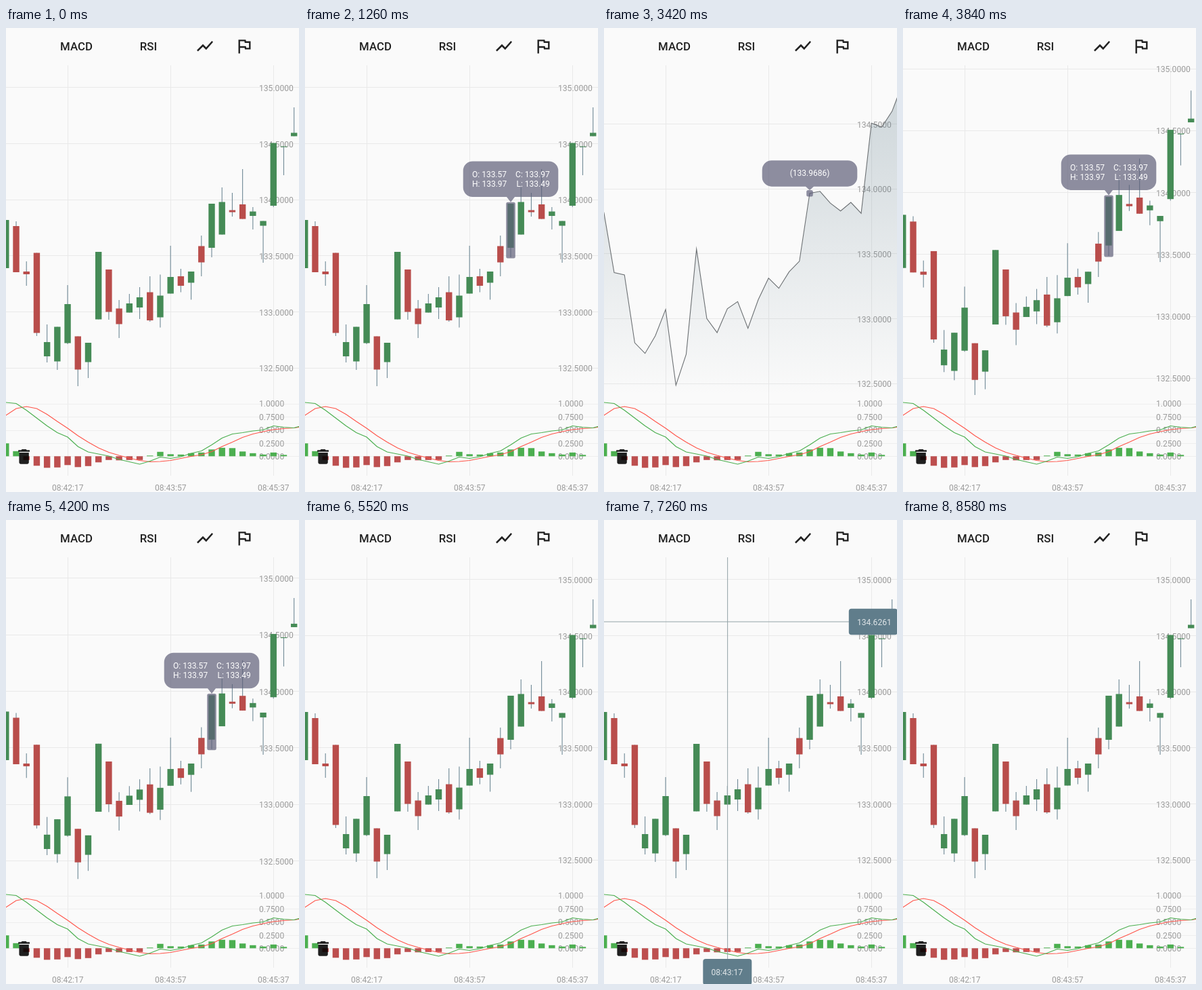
An HTML page with a canvas for the animation above (9360 ms loop, 433x684 px).

```html
<!DOCTYPE html>
<html lang="en">
<head>
<meta charset="utf-8">
<title>Candle chart</title>
<style>
html, body { margin: 0; width: 100%; height: 100%; overflow: hidden; background: #fafafa; }
canvas { display: block; }
</style>
</head>
<body>
<canvas id="stage" width="433" height="684"></canvas>
<script>
const ctx = document.getElementById('stage').getContext('2d');
const LOOP = 9360, STEP = 60;
const W = 433, TOP = 55, BOTTOM = 541, ZERO = 631.3;
const GREEN = '#458b56', RED = '#b94d4b', LABEL = '#9c9c9c', SLATE = '#607d8b';
const TIP = 'rgba(96,96,122,.7)';
const PICKED = 20;

// open, close, high, low as heights on the candle scale
const candles = [
  [354, 283, 283, 354], [292, 360, 285, 360], [359, 363, 344, 380], [331.5, 449.5, 331.5, 454],
  [484, 463, 437, 493], [491.5, 440.5, 440.5, 504], [464.5, 407, 379, 466], [454.5, 503.5, 454.5, 528],
  [492.5, 464, 464, 516], [429.5, 330, 330, 429.5], [356, 418.5, 356, 430], [413.5, 436.5, 401, 457],
  [419.5, 406, 392, 419.5], [412, 397, 382, 429], [389.5, 431, 366, 433], [426.5, 394.5, 363.5, 441.5],
  [391.5, 367, 321, 391.5], [366, 380, 355, 389.5], [375.5, 359, 359, 400.5], [321.5, 345.5, 306, 366],
  [324, 259, 259, 338], [304.5, 256.5, 235, 304.5], [268.5, 271.5, 243, 278], [260, 281.5, 208, 281.5],
  [277, 270.5, 264, 297], [291.5, 284.5, 284.5, 346], [262, 169.5, 169.5, 264], [175.5, 174.5, 174.5, 217],
  [159.5, 154.5, 117, 159.5], [154, 120, 120, 154]
];
const macd = [552, 553.5, 563.5, 575, 586.5, 596.5, 603, 617, 625, 628, 631, 636, 639.5, 643, 638.5,
  632.5, 634.5, 632, 627, 623.5, 614.5, 604.5, 598.5, 596.5, 594, 592.5, 586.5, 588.5, 589.5, 585];
const signal = [571, 561, 558, 561, 569.5, 580, 590, 601, 610.5, 619, 625.5, 630, 634, 637.5, 639.5,
  639, 637.5, 634.5, 631.5, 629, 624.5, 617, 610.5, 603.5, 598.5, 595, 592, 590.5, 589.5, 587.5];

// Material-style 24-unit outlines
const trendIcon = new Path2D('M3.5 18.49l6-6.01 4 4L22 6.92l-1.41-1.41-7.09 7.97-4-4L2 16.99z');
const flagIcon = new Path2D('M12.36 6l.4 2H18v6h-3.36l-.4-2H7V6h5.36M14 4H5v17h2v-7h5.6l.4 2h7V6h-5.6L14 4z');
const binIcon = new Path2D('M6 19c0 1.1.9 2 2 2h8c1.1 0 2-.9 2-2V7H6zM19 4h-3.5l-1-1h-5l-1 1H5v2h14z');

const clamp = v => Math.max(0, Math.min(1, v));
const colX = i => i * 15.21 - 0.2;
const priceY = p => 171.1 + (134.5 - p) * 165.35;

let zoom = 1;
const zoomY = y => 356.5 + (y - 356.5) * zoom;

function text(str, x, y, color, align = 'left', font = '12.1px Roboto, sans-serif') {
  ctx.font = font;
  ctx.fillStyle = color;
  ctx.textAlign = align;
  ctx.fillText(str, x, y);
}

function segment(x1, y1, x2, y2, color, width = 1) {
  ctx.strokeStyle = color;
  ctx.lineWidth = width;
  ctx.beginPath();
  ctx.moveTo(x1, y1);
  ctx.lineTo(x2, y2);
  ctx.stroke();
}

function box(x, y, w, h, r, color) {
  ctx.fillStyle = color;
  ctx.beginPath();
  ctx.roundRect(x, y, w, h, r);
  ctx.fill();
}

function polyline(ys, color, width) {
  ctx.strokeStyle = color;
  ctx.lineWidth = width;
  ctx.beginPath();
  ys.forEach((y, i) => ctx.lineTo(colX(i), y));
  ctx.stroke();
}

function icon(path, x, y, color) {
  ctx.save();
  ctx.translate(x, y);
  ctx.scale(1.2, 1.2);
  ctx.fillStyle = color;
  ctx.fill(path, 'evenodd');
  ctx.restore();
}

function drawToolbar() {
  const font = '500 16.8px Roboto, sans-serif';
  text('MACD', 104, 32.5, '#212121', 'center', font);
  text('RSI', 210.5, 32.5, '#212121', 'center', font);
  icon(trendIcon, 279.6, 12.4, '#212121');
  icon(flagIcon, 337.5, 12.4, '#212121');
}

function drawGrid() {
  const line = '#e9e9e9';
  ['08:42:17', '08:43:57', '08:45:37'].forEach((time, i) => {
    const x = 91.5 + i * 152;
    segment(x, TOP, x, 660, line);
    text(time, x - .3, 682, LABEL, 'center');
  });
  for (let p = 135; p >= 132.5; p -= .5) {
    const y = zoomY(priceY(p));
    if (y < TOP) continue;
    segment(0, Math.round(y) - .5, W, Math.round(y) - .5, line);
    text(p.toFixed(4), 374, y + 4.6, LABEL);
  }
  for (let v = 0; v <= 1; v += .25) {
    const y = ZERO - v * 77.6;
    segment(0, Math.round(y) + .5, W, Math.round(y) + .5, '#eeeeee');
    text(v.toFixed(4), 374, y + 4.6, LABEL);
  }
}

function drawCandles() {
  candles.forEach(([open, close, high, low], i) => {
    const x = colX(i), a = zoomY(Math.min(open, close)), b = zoomY(Math.max(open, close));
    segment(x, zoomY(high), x, zoomY(low), '#6f8996', 1.1);
    ctx.fillStyle = close < open ? GREEN : RED;
    ctx.fillRect(x - 4.7, a, 9.4, b - a);
  });
}

function drawArea() {
  const ys = candles.map(c => zoomY(c[1]));
  const fill = ctx.createLinearGradient(0, 90, 0, BOTTOM);
  fill.addColorStop(0, 'rgba(96,125,139,.29)');
  fill.addColorStop(1, 'rgba(96,125,139,0)');
  ctx.fillStyle = fill;
  ctx.beginPath();
  ctx.moveTo(colX(0), BOTTOM);
  ys.forEach((y, i) => ctx.lineTo(colX(i), y));
  ctx.lineTo(colX(ys.length - 1), BOTTOM);
  ctx.fill();
  polyline(ys, '#6c7073', 1.1);
}

function drawMacd() {
  macd.forEach((m, i) => {
    const h = m - signal[i];
    ctx.fillStyle = h < 0 ? '#4caf50' : '#bd4f4f';
    ctx.fillRect(colX(i) - 4.7, ZERO, 9.4, h);
  });
  polyline(signal, '#ff5449', 1.1);
  polyline(macd, '#4caf50', 1.2);
  icon(binIcon, 12.2, 617.5, 'rgba(0,0,0,.88)');
}

function drawTooltip(alpha, isLine) {
  if (!alpha) return;
  const [, close, , low] = candles[PICKED];
  const x = colX(PICKED), y = zoomY(close);
  const height = isLine ? 38.5 : 52.5, base = y - 10;
  const markTop = isLine ? y - 4.7 : y - 2.3;
  const markEnd = isLine ? y + 4.7 : zoomY(low) + 1.5;
  const half = isLine ? 4.8 : 6.8;
  ctx.globalAlpha = alpha;
  box(x - half, markTop, half * 2, markEnd - markTop, 2.5, TIP);
  ctx.beginPath();
  ctx.roundRect(x - 70.3, base - height, 140.6, height, 14);
  ctx.moveTo(x - 6, base);
  ctx.lineTo(x + 6, base);
  ctx.lineTo(x, markTop);
  ctx.fill();
  const font = '12px Roboto, sans-serif', white = '#fff';
  if (isLine) {
    text('(133.9686)', x, base - 15.3, white, 'center', font);
  } else {
    text('O: 133.57', 247, base - 29.3, white, 'left', font);
    text('C: 133.97', 361.7, base - 29.3, white, 'right', font);
    text('H: 133.97', 247, base - 14.8, white, 'left', font);
    text('L: 133.49', 361.7, base - 14.8, white, 'right', font);
  }
  ctx.globalAlpha = 1;
}

function crosshairAt(t) {
  if (t < 6540) return [9, 166];
  if (t < 6600) return [9, 162];
  if (t < 6900) return [10, 160];
  const k = clamp((t - 6900) / 360);
  return [Math.round(10 + 2 * k), 158 - 8 * k];
}

function drawCrosshair(t) {
  if (t < 6000 || t >= 8580) return;
  const [col, y] = crosshairAt(t), x = colX(col);
  const price = (134.5 + (171.02 - y) / 166.7).toFixed(4);
  const seconds = 17 + (col - 6) * 10;
  const time = `08:${42 + Math.floor(seconds / 60)}:${String(seconds % 60).padStart(2, '0')}`;
  segment(0, y, 362, y, '#93a3a8');
  segment(x + .3, TOP, x + .3, 647, '#93a3a8');
  box(361.8, y - 19.2, 72, 38.4, 4, SLATE);
  box(x - 36, 647, 72, 38.4, 4, SLATE);
  text(price, 374, y + 4.8, '#dfe5e8');
  text(time, x - .5, 671, '#dfe5e8', 'center');
}

function zoomAt(t) {
  const grow = .159;
  if (t < 2820) return 1;
  if (t < 3780) return 1 + grow * (1 - Math.exp((2820 - t) / 140));
  return 1 + grow * Math.exp((3780 - t) / 140);
}

function draw(t) {
  const isLine = t >= 2820 && t < 3780;
  zoom = zoomAt(t);
  ctx.fillStyle = '#fafafa';
  ctx.fillRect(0, 0, W, 684);
  drawGrid();
  ctx.save();
  ctx.beginPath();
  ctx.rect(0, TOP, W, BOTTOM - TOP);
  ctx.clip();
  if (isLine) drawArea(); else drawCandles();
  ctx.restore();
  drawMacd();
  drawTooltip(Math.min(clamp((t - 780) / 480), clamp((5520 - t) / 480)), isLine);
  drawCrosshair(t);
  drawToolbar();
}

const start = performance.now();
function frame() {
  const t = (performance.now() - start) % LOOP;
  draw(Math.floor(t / STEP) * STEP);
  requestAnimationFrame(frame);
}
frame();
</script>
</body>
</html>
```
